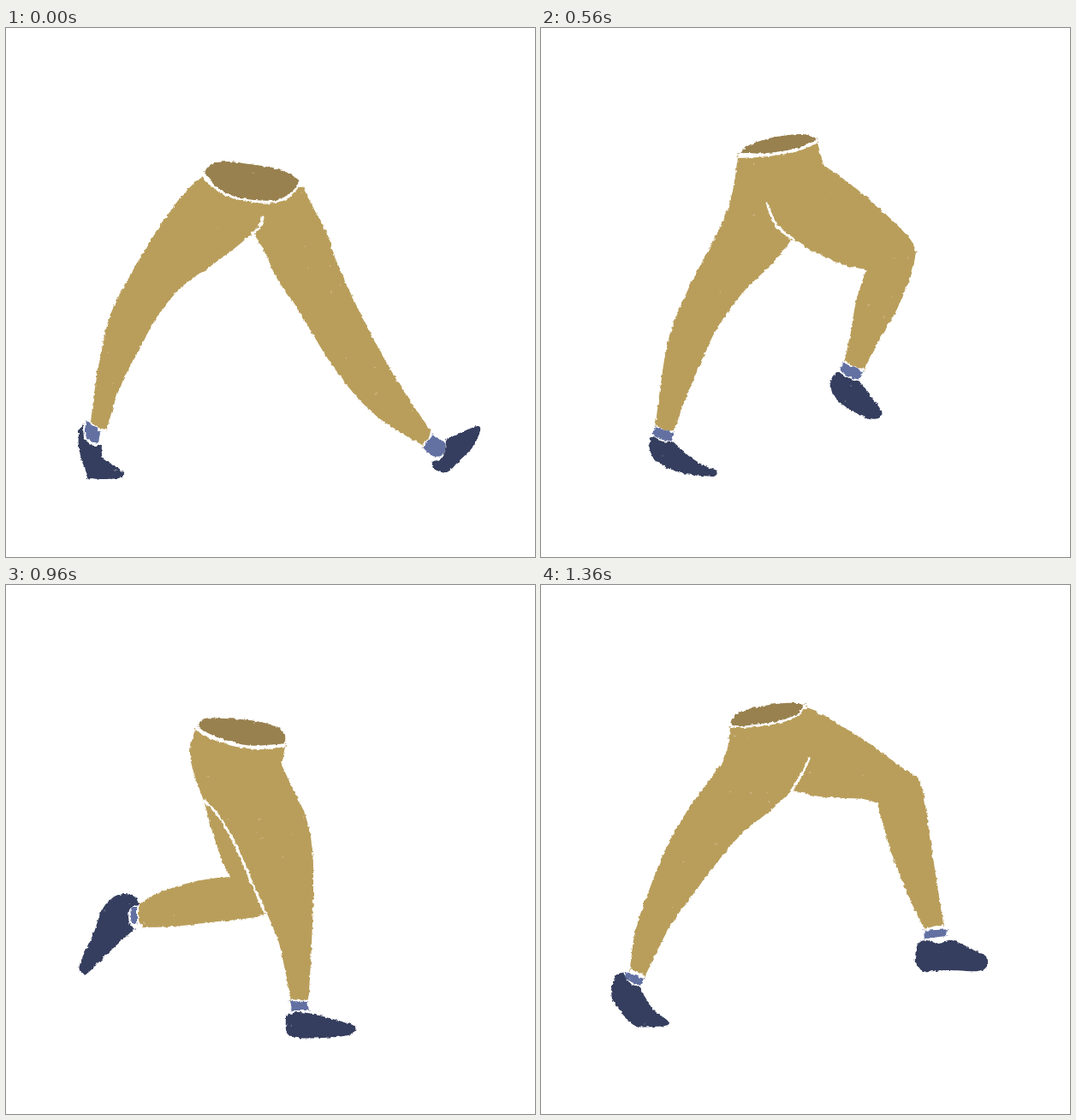
Animation of 618x618 px, one loop 1.44 s. Source, as an HTML page with a canvas:

```html
<!DOCTYPE html>
<html lang="en">
<head>
<meta charset="utf-8">
<title>Walk cycle</title>
<style>
  html, body { margin: 0; width: 100%; height: 100%; overflow: hidden; background: #fff; }
  canvas { display: block; filter: url(#rough); }
  svg { position: absolute; width: 0; height: 0; }
</style>
</head>
<body>
<canvas width="618" height="618"></canvas>
<svg>
  <filter id="rough" x="0" y="0" width="1" height="1" color-interpolation-filters="sRGB">
    <feTurbulence type="fractalNoise" baseFrequency=".22" numOctaves="2" result="noise"/>
    <feDisplacementMap in="SourceGraphic" in2="noise" scale="4" xChannelSelector="R" yChannelSelector="G"/>
  </filter>
</svg>
<script>
const STEP = 80;
const COLORS = { waist: '#98814e', pants: '#b99e5b', sock: '#6270a2', shoe: '#353e5e' };

// One step of the walk. Points are "x,y"; "!" marks a corner, "/" separates shapes.
// crease and crotch hold two versions: swinging leg nearest, standing leg nearest.
const POSES = [
  {
    waist: '232,168! 240,159 258,156 285,159 318,165 340,176 341,182 332,193 315,201 290,201 265,196 246,186',
    pants: '205,303 178,335 155,377 133,420 118,468! 108,467 99,460! 104,420 112,375 122,335 145,289 175,239 200,203 220,181 229,174! 236,181 246,190 262,198 290,204 315,204 331,198 342,186! 347,186! 360,212 375,240 385,270 405,315 430,365 460,417 482,450 496,470! 494,478 486,487! 460,472 430,451 403,423 375,385',
    crotch: ['345,335 318,295 302,262 289,239! 265,259 235,281', '355,352 325,318 300,293 275,274 257,262! 235,278'],
    crease: ['288,240 296,233 300,222', '226,198 228,215 236,237 257,262'],
    sock: '94,459! 110,471! 107,485 97,481 92,472 / 498,475! 512,485 511,498 498,500 487,490!',
    shoe: '85,470! 90,463! 92,480 104,488 112,486! 113,502 125,510 137,519 135,525 115,527 95,526! 90,510 85,490 / 498,507! 511,500 514,481! 535,471 550,465 554,470 545,490 530,505 515,519 500,515'
  },
  {
    waist: '230,165! 238,156 252,153 278,157 310,164 332,173 333,180 325,189 312,194 290,193 263,187 240,178',
    pants: '226,170! 240,183 265,192 292,198 315,199 332,187! 336,197! 360,225 385,258 405,295 425,340 445,400 460,470! 450,478 437,478! 415,450 395,410 375,360 355,325 325,298 297,268! 285,300 262,335 240,375! 215,395 170,415 130,435 100,438! 92,428 92,412! 120,398 150,378 180,345 188,310 195,270 203,230 212,195',
    crease: ['297,268 296,248 294,226', '227,205 233,235 260,258 297,268'],
    sock: '74,410! 90,412! 91,430 84,440 73,432 / 441,481! 462,475! 466,488 456,496 444,493',
    shoe: '50,415! 60,405 74,406! 69,420 72,434 82,444! 75,460 55,490 42,505 33,502 34,480 42,445 / 437,500! 448,496 458,500 468,490! 495,492 520,491 530,497 522,506 490,517 455,523 440,517'
  },
  {
    waist: '230,162! 236,152 246,150 270,155 300,162 322,169 326,177 319,184 308,188 290,186 262,180 235,172',
    pants: '223,167! 232,174 260,183 290,189 312,192 325,184! 325,203! 345,216 378,246 400,278 422,304 429,322 431,370 429,410 426,450 425,487! 399,486! 388,450 380,415 376,370 377,321! 355,316 330,307 313,296 303,294! 298,292! 298,340 295,375 288,390 270,398 225,399 175,398 140,392 120,384 112,373 114,361 130,354 165,344 200,337 235,333! 226,310 218,270 213,235 210,212 213,190',
    crease: ['288,230 296,253 300,275 302,294', '228,215 238,245 265,275 302,294'],
    sock: '92,366 100,361 110,363! 108,378 111,388! 102,395 93,395 88,385 / 400,488! 424,488! 425,498 418,502 405,502 396,499',
    shoe: '66,366! 72,357 82,357 94,360! 87,368 85,385 89,398 97,404! 85,420 75,440 66,446 60,440 61,415 63,385 / 388,502! 397,500 408,507 420,506 428,496! 450,502 475,511 485,519 482,526 455,526 420,528 395,528 388,520'
  },
  {
    waist: '224,165! 232,156 255,156 285,158 312,164 325,173 326,185! 305,187 280,187 250,179 232,171',
    pants: '221,169! 238,179 265,188 295,192 326,189! 322,210! 335,238 350,270 358,310 359,360 357,420 354,478! 350,485 333,484! 326,450 318,415 305,384! 285,389 240,394 195,399 160,400! 155,390 156,373! 175,361 210,349 240,343 262,341! 252,320 240,285 232,255 220,222 215,195',
    crease: ['290,215 302,260 308,320 305,384', '232,252 250,272 270,308 288,350 303,383'],
    sock: '146,378 153,376! 153,395! 147,395 / 332,486! 352,487! 354,497! 334,497!',
    shoe: '156,374! 150,364 138,361 125,365 112,380 102,408 88,438 86,450 94,454 108,441 130,420 150,402! 144,394 144,380 150,375 / 327,503! 340,499 358,501 385,508 405,514 408,520 400,526 370,529 340,529 328,523'
  },
  {
    waist: '230,163! 245,157 275,158 305,166 316,176! 290,176 260,172 240,168',
    pants: '226,168! 245,175 285,181 316,180! 322,205! 338,240 345,285 344,330 336,376! 328,386 312,390! 308,430 300,485! 290,489 276,486! 272,445 268,402! 230,404 180,410! 176,398 178,381! 205,371 235,358 262,350! 252,325 240,285 230,245 221,215 221,190',
    crease: ['234,240 250,268 270,310 285,342 262,351 / 268,402 290,397 312,390', '234,240 248,270 265,320 268,402 / 312,390 316,340 310,290'],
    sock: '168,383 176,382! 173,396 176,409! 167,408 163,396 / 275,488! 298,490! 297,502 285,504 274,500',
    shoe: '110,445! 125,415 140,385 155,368 170,366 180,378! 167,382 160,393 162,408 168,414! 145,430 120,449 111,452 / 266,508! 272,500 290,504 305,502 325,511 345,518 345,524 330,528 295,531 270,529'
  },
  {
    pants: '236,162! 243,157 265,157 290,163 307,170! 325,200 345,240 350,280 352,330 350,368! 340,381 310,391 270,402! 268,408 258,445 250,475 245,492! 235,492 220,487! 226,450 230,415! 200,415! 196,402 199,388! 215,383 236,372! 239,330 239,280 233,245 226,210 228,185',
    hole: '286,313! 305,335! 277,349!',
    crease: ['235,227 250,250 268,275 283,305 305,335 / 305,336 275,351 236,371 / 215,415 231,413 270,404', '285,230 292,270 286,313 / 277,349 274,375 268,405 / 236,371 234,390 231,414'],
    sock: '184,389 198,388! 193,402 195,416! 185,419 178,411 178,397 / 217,489! 243,493! 240,509 228,511 214,505',
    shoe: '137,440! 150,415 162,390 175,375 190,372 203,377 204,383! 188,385 177,393 174,408 178,420 187,425! 165,436 145,448 138,449 / 205,510! 210,501 216,508 230,513 243,508! 260,514 280,518 281,524 274,528 240,533 212,531 205,522'
  },
  {
    pants: '240,148! 246,140 265,140 285,137 305,143 330,155! 335,191! 355,212 380,242 402,275 414,305 414,320! 390,348 350,380 310,408 282,427! 279,420 279,402! 290,395 300,372 325,333 360,299! 335,286 310,268 294,256! 275,285 248,332 230,375 218,420 209,460 206,482! 195,482 184,478! 181,430 180,375 188,330 207,288 213,240 225,195',
    crease: ['294,256 272,238 262,210', '294,256 304,232 315,208'],
    sock: '270,405 277,405! 276,415 281,427! 270,429 266,421 / 179,475! 190,484 205,487! 204,499! 190,500 179,497!',
    shoe: '216,440! 235,420 250,400 260,388 272,385 282,391 281,402! 270,404 263,416 267,431! 250,444 225,454 217,455 / 171,513! 175,503 190,503 215,502 240,510 259,518 258,523 235,523 205,525 178,524'
  },
  {
    waist: '232,146! 245,136 275,127 305,124 322,130! 300,140 265,146',
    pants: '230,152! 265,150 300,144 323,134! 330,160! 365,185 400,215 430,245 438,262! 432,290 415,330 395,365 378,398! 366,396 355,388! 362,355 368,320 380,282! 355,277 320,262 294,246! 270,275 235,310 205,352 185,395 168,435 156,470! 145,470 134,463! 140,415 150,360 172,305 198,255 215,220 224,190',
    crease: ['294,246 275,231 264,205', '294,246 305,225 314,205'],
    sock: '353,391! 376,401! 371,410 360,407 350,400 / 133,466! 155,473! 152,482 142,481 131,475',
    shoe: '338,412! 346,402 358,408 372,413! 385,430 398,448 394,456 380,455 360,445 342,430 / 126,488! 130,477 142,483 154,484! 170,498 190,511 205,517 203,523 175,522 150,515 132,503'
  },
  {
    waist: '222,158! 230,150 250,143 285,138 308,139! 300,150 280,158 250,163 226,165',
    pants: '221,167! 250,166 280,161 300,153 311,142! 345,161 385,186 420,212 440,225! 447,245 455,300 463,350 470,396! 458,399 448,402! 430,365 410,315 397,270 393,255! 375,250 325,247 293,240! 270,262 235,290 205,325 175,365 150,400 122,456! 114,452 104,449! 110,405 125,360 145,310 170,265 195,230 213,205! 218,190',
    crease: ['293,240 278,226 265,200', '293,240 304,222 313,203'],
    sock: '448,404! 475,402! 474,410! 449,413! / 99,452! 120,460! 116,468! 98,460!',
    shoe: '437,435! 440,420 450,415 465,419 480,415 505,426 520,434 521,445 510,451 475,450 448,451 438,443 / 82,472! 86,459 96,452! 102,464 115,470! 122,482 132,497 147,508 148,514 130,516 110,515 95,500 84,485'
  }
];

const ctx = document.querySelector('canvas').getContext('2d');
const noise = document.querySelector('feTurbulence');

// Doubling a point makes the curve turn sharply there.
function parsePoints(text) {
  return text.trim().split(/\s+/).flatMap(token => {
    const point = token.replace('!', '').split(',').map(Number);
    return token.endsWith('!') ? [point, point] : [point];
  });
}

// Catmull-Rom curves through the points of every shape.
function smoothPath(text, closed) {
  const path = new Path2D();
  for (const part of text.split('/')) {
    const pts = parsePoints(part), n = pts.length;
    const at = i => closed ? pts[(i + n) % n] : pts[Math.max(0, Math.min(n - 1, i))];
    path.moveTo(...pts[0]);
    for (let i = 0; i < (closed ? n : n - 1); i++) {
      const [a, b, c, d] = [at(i - 1), at(i), at(i + 1), at(i + 2)];
      path.bezierCurveTo(
        b[0] + (c[0] - a[0]) / 6, b[1] + (c[1] - a[1]) / 6,
        c[0] - (d[0] - b[0]) / 6, c[1] - (d[1] - b[1]) / 6, c[0], c[1]);
    }
    if (closed) path.closePath();
  }
  return path;
}

function fillShape(text, color) {
  if (!text) return;
  ctx.fillStyle = color;
  ctx.fill(smoothPath(text, true));
}

function speckle(seed) {
  const random = () => (seed = (seed * 16807) % 2147483647) / 2147483647;
  ctx.globalCompositeOperation = 'source-atop';
  ctx.fillStyle = 'rgba(255,255,255,.3)';
  for (let i = 0; i < 130; i++) ctx.fillRect(random() * 618, random() * 618, 1 + random(), 1 + random());
}

function draw(index) {
  const pose = POSES[index % POSES.length];
  const near = Math.floor(index / POSES.length);
  ctx.globalCompositeOperation = 'source-over';
  ctx.clearRect(0, 0, 618, 618);
  fillShape(pose.pants + ' ' + (pose.crotch ? pose.crotch[near] : ''), COLORS.pants);

  ctx.globalCompositeOperation = 'destination-out';
  fillShape(pose.hole, '#000');
  ctx.lineWidth = 3;
  ctx.lineCap = ctx.lineJoin = 'round';
  ctx.stroke(smoothPath(pose.crease[near], false));

  ctx.globalCompositeOperation = 'source-over';
  for (const part of ['waist', 'sock', 'shoe']) fillShape(pose[part], COLORS[part]);
  speckle(index * 7919 + 31);
  noise.setAttribute('seed', index);
}

let shown = -1;
const start = performance.now();
function tick() {
  const index = Math.floor((performance.now() - start) / STEP) % (POSES.length * 2);
  if (index !== shown) draw(shown = index);
  requestAnimationFrame(tick);
}
tick();
</script>
</body>
</html>
```
